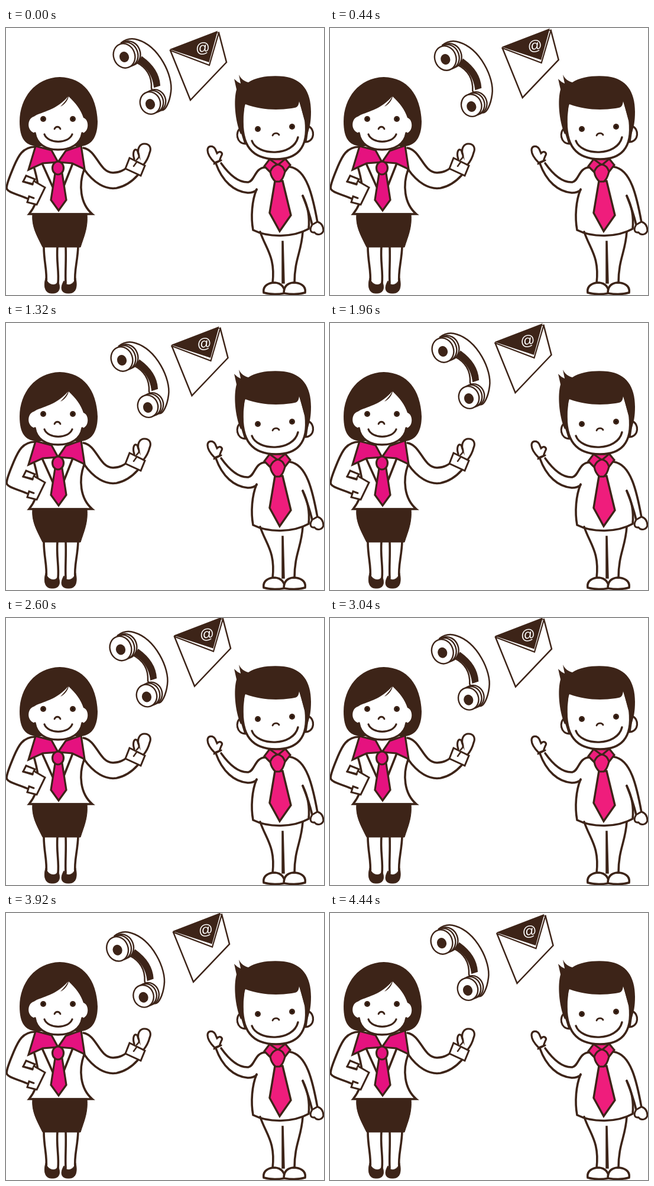
These frames come from a looping animation (538x452 px, 4.48 s). An HTML page with a canvas:

```html
<!DOCTYPE html>
<html lang="en">
<head>
<meta charset="utf-8">
<title>Contact</title>
<style>
html, body { margin: 0; width: 100%; height: 100%; overflow: hidden; background: #fff; }
canvas { display: block; width: 538px; height: 452px; }
</style>
</head>
<body>
<canvas id="stage" width="538" height="452"></canvas>
<script>
const ctx = document.getElementById('stage').getContext('2d');
const BROWN = '#3d2418', WHITE = '#fff', PINK = '#e5127f', ROSE = '#ef1d7c';
const STEP = 40, LOOP = 4480;

// Drifting offsets: [time, x, y]
const phoneKeys = [
  [0, 0, 0], [280, -3, 2], [560, -6, 6], [740, -8, 10], [880, -7, 6.5],
  [1100, -8, 14], [1200, -9.5, 16], [1320, -4, 14], [1560, -8, 8],
  [1740, -11, 11], [1960, -9, -1], [2280, -6.5, 4], [2440, -5, 8],
  [2600, -6, 4.5], [2820, -7, 7], [3100, -10, 10], [3440, -6, 4.5],
  [3720, -13, 12], [4000, -11, 14], [4240, -13, 8], [4440, -11, 2]
];
const mailKeys = [
  [0, 0, 0], [280, 8, -2], [520, 15, -5], [640, 14, -6], [880, 9.5, -3],
  [1120, 6.5, 0], [1320, 2.5, 1], [1600, 5.5, -6], [1960, 1.5, -4],
  [2220, 6, -5], [2420, 8.5, -7], [2600, 7, -6.5], [2820, 6, -5],
  [3140, 0, -6], [3440, -4, -8.5], [3760, 3, -5], [4140, 6.5, -6], [4440, 4.5, -3]
];

// Slope at a key, flat where the direction turns
function slope(keys, i, axis) {
  if (i < 1 || i > keys.length - 2) return 0;
  const [a, b, c] = [keys[i - 1], keys[i], keys[i + 1]];
  const m = (b[axis] - a[axis]) / (b[0] - a[0]);
  const n = (c[axis] - b[axis]) / (c[0] - b[0]);
  return m * n <= 0 ? 0 : 2 * m * n / (m + n);
}

function drift(keys, t) {
  let i = 0;
  while (i < keys.length - 2 && keys[i + 1][0] < t) i++;
  const a = keys[i], b = keys[i + 1], h = b[0] - a[0], u = (t - a[0]) / h;
  return [1, 2].map(k => {
    const p = u * u * (3 - 2 * u);
    return a[k] + (b[k] - a[k]) * p
      + h * slope(keys, i, k) * u * (1 - u) * (1 - u)
      - h * slope(keys, i + 1, k) * u * u * (1 - u);
  });
}

function shape(d, fill, width = 3.6) {
  const path = new Path2D(d);
  if (fill) {
    ctx.fillStyle = fill;
    ctx.fill(path);
  }
  if (width) {
    ctx.lineWidth = width;
    ctx.strokeStyle = BROWN;
    ctx.stroke(path);
  }
}

function oval(x, y, rx, ry, fill, width = 0, turn = 0) {
  ctx.beginPath();
  ctx.ellipse(x, y, rx, ry, turn, 0, Math.PI * 2);
  ctx.fillStyle = fill;
  ctx.fill();
  if (width) {
    ctx.lineWidth = width;
    ctx.strokeStyle = BROWN;
    ctx.stroke();
  }
}

function eye(x, y) {
  oval(x, y, 5, 5, BROWN);
  oval(x, y, 2, 2, '#21110a');
}

function woman() {
  // legs and shoes
  shape('M64 370 C64 397 70 410 68 432 M87 370 C85 396 90 411 88 432');
  shape('M101 370 C102 396 100 411 101 432 M122 370 C121 397 115 410 117 432');
  shape('M67 424 C64 433 64 449 77 449 C91 450 93 440 88 428 C86 437 73 438 67 424 Z', BROWN, 1);
  shape('M118 424 C120 433 121 449 107 449 C93 450 91 440 98 428 C101 437 112 438 118 424 Z', BROWN, 1);

  // shirt and arms
  shape('M49 201 C28 202 21 216 13 235 C7 250 1 263 1 271 C2 279 23 282 39 290');
  shape('M131 203 C154 207 157 244 181 245 C194 245 201 239 208 234');
  shape('M132 239 C148 262 168 274 187 271 C202 268 214 259 223 249');
  shape('M48 238 C54 260 62 286 39 315 L146 315 C125 297 123 265 132 240', null);
  shape('M61 229 L79 269 M113 229 L98 267');
  shape('M29 260 L34 250 L49 256 L45 264 Z', WHITE, 3);
  shape('M47 259 L66 270 L52 299 L36 295 L39 285 L47 288 M29 260 L45 265', WHITE, 3);

  // raised hand
  shape('M217 222 C214 213 216 205 220 206 C223 206 223 211 224 213 C222 203 227 196 234 196 C244 196 246 204 243 211 C241 219 238 225 233 231', WHITE, 3.2);
  shape('M224 212 C226 216 225 220 221 223', null, 2.8);
  shape('M209 220 L235 233 L228 250 L202 238 Z', WHITE, 3);
  shape('M216 234 L221 227', null, 2.5);

  // skirt
  shape('M45 314 L137 314 C139 338 132 352 126 371 L62 371 C51 349 43 335 45 314 Z', BROWN, 1);

  // collar and tie
  shape('M50 200 L77 207 L88 227 L62 229 L38 240 Z', PINK, 3.2);
  shape('M127 199 L101 208 L88 227 L112 229 L133 239 Z', PINK, 3.2);
  shape('M83 246 L95 246 L102 291 L89 309 L76 291 Z', PINK, 3.2);
  oval(88, 237, 9.5, 11, PINK, 3.2);

  // head
  shape('M91 83 C49 84 23 119 23 158 C23 188 33 198 50 200 L128 200 C147 198 155 181 155 158 C153 113 131 84 91 83 Z', BROWN, 0);
  shape('M47 150 C36 153 34 174 49 178 C52 197 68 206 88 206 C109 206 126 197 129 178 C141 176 141 155 131 152 C127 139 118 127 106 116 C105 122 99 130 92 133 C98 127 103 121 105 116 C88 135 73 139 52 147 Z', WHITE, 0);
  shape('M49 178 C52 197 68 206 88 206 C109 206 126 197 129 178', null, 3.4);
  eye(63, 154);
  eye(113, 154);
  shape('M82 171 C84 166 90 166 92 171', null, 2.8);
  shape('M65 180 C71 196 105 197 112 180', null, 3.2);
}

function man() {
  // trousers and shoes
  shape('M430 345 C440 375 456 387 451 432 M502 345 C500 379 488 391 488 432');
  shape('M467 361 L469 361 L471 432 L467 432 Z', BROWN, 1.5);
  shape('M436 448 C434 436 445 431 455 431 C466 432 471 438 472 449 C460 451 446 451 436 448 Z', WHITE);
  shape('M506 448 C508 436 497 431 486 431 C476 432 470 438 470 449 C482 451 496 451 506 448 Z', WHITE);

  // body and arms
  shape('M364 229 C379 250 395 262 410 261 C421 259 421 236 439 236');
  shape('M355 229 C366 260 386 277 409 279 C417 279 421 277 424 274');
  shape('M424 273 C416 292 414 320 418 342 C444 355 485 355 512 340 C514 321 511 302 502 284');
  shape('M480 235 C509 239 519 285 527 329 M502 284 C508 299 514 316 518 333');
  shape('M518 333 C513 341 515 347 522 346 C526 352 535 350 537 343 C537 335 533 330 527 328 Z', WHITE, 3);
  shape('M353 228 C347 222 341 215 341 207 C341 199 350 198 354 205 L357 212 C362 207 368 211 364 217 L361 225 Z', WHITE, 3.2);
  shape('M352 230 L364 224', null, 3);

  // collar and tie
  shape('M437 234 L446 222 L472 221 L481 232 L470 246 L450 247 Z', ROSE, 3.2);
  shape('M446 222 L460 232 L473 221', null, 3);
  shape('M455 259 L468 259 L482 317 L463 344 L446 313 Z', ROSE, 3.4);
  shape('M447 243 C450 236 455 232 460 231 C466 232 470 237 472 243 C470 252 466 258 463 260 L456 260 C450 255 448 250 447 243 Z', ROSE, 3.2);

  // head
  shape('M397 170 C387 175 390 196 405 196 Z', WHITE, 3.2);
  shape('M511 166 C523 170 523 192 507 193 Z', WHITE, 3.2);
  shape('M400 150 C398 199 416 222 457 222 C491 222 512 205 507 157 L497 120 L403 120 Z', WHITE);
  shape('M386 86 C391 91 393 92 397 94 L394 79 C398 87 403 90 410 92 C425 82 449 80 470 82 C501 86 516 107 516 142 C516 157 514 169 510 179 C507 160 502 144 496 124 C495 134 491 135 483 136 C455 140 430 138 405 129 C401 139 401 152 402 172 L397 180 C387 155 385 122 390 104 Z', BROWN, 0);
  eye(426, 171);
  eye(484, 167);
  shape('M451 182 C453 177 460 177 462 181', null, 2.8);
  shape('M416 191 C425 217 486 218 494 185', null, 3.4);
}

function phone() {
  shape('M195 25 C204 18 214 17 223 20 C259 31 283 81 279 108 C277 124 270 142 262 139 L246 102 C247 82 238 67 220 58 Z', WHITE, 2.5);
  shape('M230 49 C248 62 259 79 260 97 L251 100 C249 81 239 66 224 58 Z', BROWN, 2);
  for (const [x, y, rx, ry] of [[200, 47, 18, 21], [244, 127, 17, 19]]) {
    for (const k of [9, 5, 0]) oval(x + k, y - k * 0.45, rx, ry, WHITE, 2.4, -0.35);
    oval(x, y + 2, 8, 9, BROWN, 0, -0.35);
  }
}

function mail() {
  shape('M278 38 L312 122 L373 58 L360 8 Z', WHITE, 2.5);
  shape('M278 38 L344 63 L360 8', WHITE, 2.2);
  shape('M279 36 L357 6 L343 57 Z', BROWN, 1.5);
  ctx.save();
  ctx.translate(333, 35);
  ctx.rotate(-0.12);
  ctx.fillStyle = WHITE;
  ctx.font = '24px "Liberation Sans", Arial, sans-serif';
  ctx.textAlign = 'center';
  ctx.textBaseline = 'middle';
  ctx.fillText('@', 0, 0);
  ctx.restore();
}

function floating(draw, keys, t) {
  ctx.save();
  ctx.translate(...drift(keys, t));
  draw();
  ctx.restore();
}

const start = performance.now();
function render() {
  const now = Math.max(0, performance.now() - start);
  const t = Math.floor(now % LOOP / STEP) * STEP;
  ctx.fillStyle = WHITE;
  ctx.fillRect(0, 0, 538, 452);
  ctx.lineJoin = 'miter';
  ctx.lineCap = 'round';
  woman();
  man();
  floating(phone, phoneKeys, t);
  floating(mail, mailKeys, t);
  requestAnimationFrame(render);
}
render();
</script>
</body>
</html>
```
